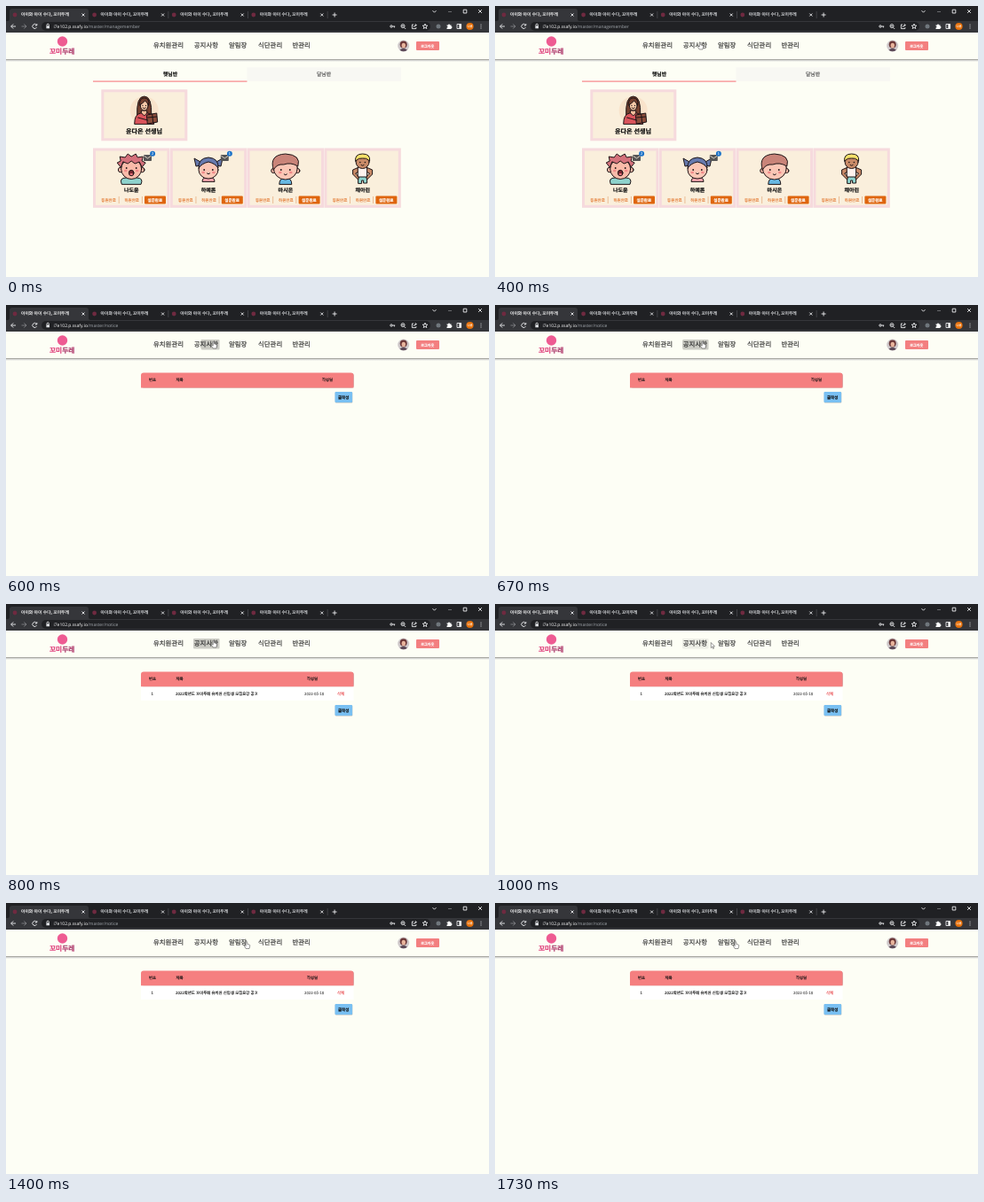
Recreate the animation shown at these times as an HTML page. Size 544 by 306 pixels, loop 1790 ms.

```html
<!DOCTYPE html>
<html lang="ko">
<head>
<meta charset="utf-8">
<style>
html, body { margin: 0; width: 100%; height: 100%; overflow: hidden; background: #fdfef5 }
svg { display: block; width: 100vw; height: 100vh; text-rendering: geometricPrecision;
  font-family: "Noto Sans CJK KR", "Noto Sans CJK", "Noto Sans CJK JP", sans-serif }
.url { font-family: "Open Sans", sans-serif }
.ink { stroke: #1d1416; stroke-width: 1; stroke-linejoin: round; stroke-linecap: round }
.icon { fill: none; stroke: #eceef0; stroke-width: .9 }
</style>
</head>
<body>
<svg id="stage" viewBox="0 0 544 306"></svg>
<script>
const LOOP = 1790, STEP = 200 / 3, BRAND = '꼬미두레';

const rect = (x, y, w, h, fill, more = '') =>
  `<rect x="${x}" y="${y}" width="${w}" height="${h}" fill="${fill}" ${more}/>`;
const circle = (x, y, r, fill, more = '') => `<circle cx="${x}" cy="${y}" r="${r}" fill="${fill}" ${more}/>`;
const oval = (x, y, rx, ry, fill, more = '') =>
  `<ellipse cx="${x}" cy="${y}" rx="${rx}" ry="${ry}" fill="${fill}" ${more}/>`;
const path = (d, fill = 'none', more = '') => `<path d="${d}" fill="${fill}" ${more}/>`;
// A hairline stroke gives small type the weight of screen rendering.
const text = (x, midY, size, str, fill = '#111', more = '') =>
  `<text x="${x}" y="${midY + size * .37}" font-size="${size}" fill="${fill}" stroke="${fill}"
    stroke-width="${size * .03}" ${more}>${str}</text>`;
const centered = (x, y, size, str, fill, weight = 400) =>
  text(x, y, size, str, fill, `text-anchor="middle" font-weight="${weight}"`);
const group = (content, attrs = '') => `<g ${attrs}>${content}</g>`;
const cross = (x, y, r) => `M${x - r} ${y - r}l${2 * r} ${2 * r}m0 ${-2 * r}l${-2 * r} ${2 * r}`;

function browser() {
  let out = rect(0, 0, 544, 30, '#35363a') + rect(0, 0, 544, 17, '#202124') +
    path('M2 17Q4 17 4 15V6Q4 3 7 3H90Q93 3 93 6V15Q93 17 95 17Z', '#35363a');
  for (let i = 0; i < 4; i++) {
    const x = 4 + i * 89.6;
    out += circle(x + 6, 10, 2.4, '#6f2a40') +
      text(x + 13, 9.7, 4.8, '아이와 아이 수다, ' + BRAND, i ? '#e3e5e8' : '#fff') +
      path(cross(x + 83, 10, 1.5), 'none', 'class="icon"');
    if (i) out += rect(x + 89, 6, .6, 8, '#55585d');
  }
  out += rect(40, 18, 438, 10, '#202124', 'rx="5"');
  const icons = [
    'M367.6 10h5M370.1 7.5v5', 'M480.5 5.2l2 2 2-2', 'M515.2 4.2h3.6v3.8h-3.6z', cross(534, 6, 1.9),
    'M11 23H5.8m2.4-2.6L5.6 23l2.6 2.6', 'M34.3 21.4a2.5 2.5 0 1 0 .3 2.6M34.8 20v2h-2',
    'M46 22.4v-1a1.2 1.2 0 0 1 2.4 0v1', 'M435.2 23h3m-.8 0v1.4',
    'M448.5 24.3l1.7 1.7M445.7 22.6h2.4', 'M459 21h-1.6v4.6h4.4V24M459.2 24q.4-2.4 3-2.4m-1.3-1.4l1.4 1.4-1.4 1.4',
    'M472 20.2l.8 1.9 2 .1-1.6 1.3.6 2-1.8-1.1-1.8 1.1.6-2-1.6-1.3 2-.1z', 'M508 20.5h4.6v5H508z'];
  out += path(icons.join(''), 'none', 'class="icon"') +
    path('M17.5 23h5.2m-2.4-2.6l2.6 2.6-2.6 2.6M498 6.5h4', 'none', 'class="icon" opacity=".4"') +
    circle(434, 23, 1.2, 'none', 'class="icon"') + circle(447, 22.6, 2, 'none', 'class="icon"') +
    rect(45.4, 22.3, 3.6, 3, '#dfe1e5') + rect(510.3, 20.5, 2.4, 5, '#eee') +
    circle(487, 23, 2.5, '#70777d') +
    path('M496.5 21.5h1.5a1 1 0 0 1 2 0h1.5v1.5a1 1 0 0 1 0 2v1h-5v-1.4a1 1 0 0 0 0-2z', '#fff') +
    circle(522.5, 23, 4.1, '#e8710a') + centered(522.5, 23, 3.2, '나은', '#fff');
  for (const y of [21, 23, 25]) out += circle(535, y, .6, '#e8eaed');
  return out + `<text x="53.5" y="25" font-size="5" class="url" fill="#fff">i7e102.p.ssafy.io<tspan
    id="route" fill="#a4a9af"></tspan></text>`;
}

function header() {
  const nav = [[166, '유치원관리'], [211.8, '공지사항'], [251, '알림장'], [284, '식단관리'], [322.5, '반관리']];
  return rect(0, 61, 544, 2, 'url(#shade)') + rect(0, 30, 544, 30, '#fdfef5') + rect(0, 60, 544, 1, '#a8a8a3') +
    circle(63.5, 40, 5.7, '#ee5b92') +
    text(49, 51, 7.7, `${BRAND.slice(0, 2)}<tspan fill="#8d3f66">${BRAND.slice(2)}</tspan>`, '#e0457f', 'font-weight="700"') +
    nav.map(([x, s]) => text(x, 44.7, 7.4, s, '#444')).join('') +
    circle(447.7, 45, 6.5, '#cfc9cb') + circle(447.7, 43.6, 4, '#6b3737') +
    oval(447.8, 44.6, 2.2, 2.8, '#e8b49c') + path('M443.5 49.8q4.2-4 8.4 0-4.2 3-8.4 0', '#5c4a58') +
    rect(462, 40, 26, 10, '#f37f80', 'rx="1"') + centered(474.7, 45, 4.1, '로그아웃', '#fff', 700);
}

const eyes = (x, y, gap) => circle(x - gap, y, .9, '#1d1416') + circle(x + gap, y, .9, '#1d1416') +
  oval(x - gap - 1, y + 3, 1.8, 1.3, '#f28a8a') + oval(x + gap + 1, y + 3, 1.8, 1.3, '#f28a8a');
const smile = (x, y) => path(`M${x - 1.6} ${y}q1.6 1.8 3.2 0`, 'none', 'class="ink"');

// Each figure is drawn around x = 0 with its top near y = 0.
const teacher = circle(0, 17, 16, '#f9e3cb') + group(
  path('M-8 23Q-9 1 0 1T8 23Z', '#74402f') + path('M-11 32Q-11 21 -4 20H4Q11 21 11 32Z', '#d9545b') +
  path('M-3 17H3V20L0 23-3 20Z', '#f5bd9b') + oval(0, 11, 4.4, 6, '#f7c9a8') +
  path('M-5 11Q-6 3 0 3 6 3 5 11 3 8 1 6-2 9-5 11', '#74402f') +
  path('M3 22L14 20 15 30 4 32Z', '#8c4d3c') + path('M4 25L14 24M9 21L10 31M-7 25L4 28'), 'class="ink"') +
  circle(-1.8, 11.4, .6, '#1d1416') + circle(1.8, 11.4, .6, '#1d1416') + smile(0, 14);

const kids = [
  group(path('M-11 34Q-14 27 -6 27H6Q14 27 11 34Z', '#8ed3cd') + circle(-12, 18, 2.8, '#f9bba9') + circle(12, 18, 2.8, '#f9bba9') +
    oval(0, 17, 11.5, 11.5, '#f9bba9') +
    path('M-12 15L-16 10-12 8-13 3-7 4-4 0 0 3 5 0 7 4 13 3 12 8 16 10 12 15 9 9 4 11 0 8-4 11-9 9Z', '#d4717b'), 'class="ink"') +
    eyes(0, 16, 5.5) + oval(0, 21.5, 2.8, 3.2, '#7c2932', 'class="ink"') + oval(0, 23, 1.7, 1, '#f27a80'),
  group(path('M-7 31Q-7 26 0 26T7 31Z', '#f3a5ad') + path('M-9 9L-16 5-14 14-9 13ZM9 9L16 5 14 14 9 13Z', '#6679ad') +
    oval(0, 18, 11, 10, '#fbc6b5') + path('M-11 16Q-12 5 0 4 12 5 11 16 8 11 0 9-8 11-11 16', '#6679ad'), 'class="ink"') +
    eyes(0, 18, 4.8) + smile(0, 22),
  group(path('M-7 34Q-7 27 0 27T7 34Z', '#68b9e3') + circle(-13.5, 19, 2.6, '#f9bba9') + circle(13.5, 19, 2.6, '#f9bba9') +
    oval(0, 16, 13.5, 13, '#fbc6b5') + path('M-13.5 18Q-19 1 0 0 18 1 14 14 6 9-2 12-10 11-13.5 18', '#c98479'), 'class="ink"') +
    eyes(0, 18, 5) + smile(0, 23),
  group(path('M-5 33V25H5V33H1V30H-1V33Z', '#8ed3cd') +
    path('M-4 15L-11 18-11 23-5 29-4 26-8 22-4 20ZM4 15L11 18 11 23 5 29 4 26 8 22 4 20Z', '#c98b68') +
    path('M-5 15H5V26H-5Z', '#fff3ed') + oval(0, 9, 7.5, 7.5, '#c98b68') +
    path('M-8 8Q-9 0 0 0 9 0 8 8 4 4 0 5-4 4-8 8', '#f5e16a'), 'class="ink"') +
    circle(-2.8, 9.5, .8, '#1d1416') + circle(2.8, 9.5, .8, '#1d1416') + smile(0, 12.5)];

const at = (x, y, content) => group(content, `transform="translate(${x} ${y})"`);
const card = (x, y, w, h) => rect(x + 1.5, y + 1.5, w - 3, h - 3, '#faefdc', 'stroke="#f6dadd" stroke-width="3"');

function mail(x, count) {
  return rect(x - 4.5, 168, 9, 7, '#555', 'rx=".8"') + path(`M${x - 4} 169.2l4 2.8 4-2.8`, 'none', 'stroke="#faefdc" stroke-width=".8"') +
    circle(x + 5.6, 166.8, 3, '#1d73c9') + centered(x + 5.6, 166.7, 3.8, count, '#fff');
}

function members() {
  const names = ['나도윤', '하예론', '마시온', '채아린'];
  return rect(271.5, 69.5, 173.5, 15.5, '#f8f8f3') + rect(98, 84.3, 173.5, 1.7, '#f8a9a9') +
    centered(185, 76.7, 5.8, '햇님반', '#111', 700) + centered(358, 76.7, 5.8, '달님반', '#555') +
    card(107.3, 94.3, 97, 58) + at(155.7, 101, teacher) + centered(155.5, 141.7, 7.1, '윤다온 선생님', '#111', 700) +
    names.map((name, i) => {
      const x = 98 + i * 86.8;
      let out = card(x, 160.5, 86.4, 67.3) + at(x + 43.2, 167, kids[i]) + centered(x + 43.3, 208.2, 6, name, '#111', 700);
      ['등원완료', '하원완료', '설문완료'].forEach((label, j) => {
        const done = j == 2, left = x + 5.8 + j * 26.1;
        out += (done ? rect(left, 214.6, 24, 8.8, '#df650d', 'rx="1"') : rect(left + 23, 215, .7, 8, '#e5a878')) +
          centered(left + 11.8, 218.9, 4.5, label, done ? '#fff' : '#e2772f', done ? 700 : 400);
      });
      return out;
    }).join('') + mail(159.5, 2) + mail(246.3, 1);
}

function notice() {
  return rect(152.4, 77, 239.6, 16.8, '#b9a8a4', 'rx="3" opacity=".7"') + path('M152 93.5V79.5Q152 76.5 155 76.5H388.5Q391.5 76.5 391.5 79.5V93.5Z', '#f57f80') +
    text(161, 84.7, 4.4, '번호') + text(191.5, 84.7, 4.4, '제목') +
    group(text(0, 84.7, 4.4, '작성일'), 'id="dateHead"') +
    group(rect(152, 93.5, 239.5, 15.5, '#fff') + text(163.6, 101.2, 4.3, '1', '#333') +
      text(191, 101.2, 4.4, `2022학년도 ${BRAND} 유치원 신입생 모집요강 공고`) +
      text(336, 101.2, 4.3, '2022-05-18', '#555') + text(373, 101.2, 4.4, '삭제', '#e8484c'), 'id="row"') +
    group(rect(370.8, -5.6, 19.5, 12, '#a9b4b8', 'rx="1"') + rect(370.5, -6, 19.5, 12, '#79c0f2', 'rx="1"') +
      centered(380.2, 0, 4.5, '글작성', '#111', 700), 'id="write"');
}

document.getElementById('stage').innerHTML = `<defs>
  <linearGradient id="shade" x2="0" y2="1"><stop stop-color="#ccc"/><stop offset="1" stop-color="#ccc" stop-opacity="0"/></linearGradient>
  <clipPath id="navButton"><rect x="211" y="39" width="29.5" height="11.5" rx="1"/></clipPath></defs>` +
  rect(0, 0, 544, 306, '#fdfef5') + group(members(), 'id="members"') + group(notice(), 'id="notice"') +
  header() + circle(232, 44.5, 0, '#000', 'id="ripple" clip-path="url(#navButton)"') + browser() +
  group(path('M-.8.6Q0-.7.8.6V3L3 3.5Q3.9 3.8 3.7 5L3 8H-.8L-2.6 5.3Q-2.6 4.2-1.5 4.6L-.8 5.2Z', '#fff', 'id="hand"') +
    path('M0 0V6L1.4 4.8 2.4 7 3.3 6.6 2.3 4.4H4.2Z', '#fff', 'id="arrow"'),
    'id="cursor" stroke="#333" stroke-width=".5" stroke-linejoin="round"');

const $ = id => document.getElementById(id);
const show = (id, on) => $(id).setAttribute('display', on ? 'inline' : 'none');
const move = (id, x, y) => $(id).setAttribute('transform', `translate(${x} ${y})`);
const clamp = (v, lo, hi) => Math.min(hi, Math.max(lo, v));

function draw(now) {
  const t = Math.floor((now % LOOP + 4) / STEP) * STEP;
  const opened = t > 590, loaded = t > 725;
  show('members', !opened);
  show('notice', opened);
  show('row', loaded);
  $('route').textContent = opened ? '/master/notice' : '/master/managemember';
  move('dateHead', loaded ? 339 : 356, 0);
  move('write', 0, loaded ? 120 : 104);

  $('ripple').setAttribute('r', clamp((t - 490) * .12, 0, 24));
  $('ripple').setAttribute('opacity', clamp((1060 - t) / 190, 0, 1) * .2);

  const x = t < 870 ? 231 + 3 * clamp((t - 400) / 200, 0, 1) : 234 + 37 * clamp((t - 867) / 533, 0, 1);
  const y = 41 + 2.5 * clamp((t - 867) / 133, 0, 1);
  const hovering = x < 240.5 || x > 251;
  show('cursor', t > 395);
  show('hand', hovering);
  show('arrow', !hovering);
  move('cursor', x, y);
}

function tick() {
  draw(performance.now());
  requestAnimationFrame(tick);
}
tick();
</script>
</body>
</html>
```
